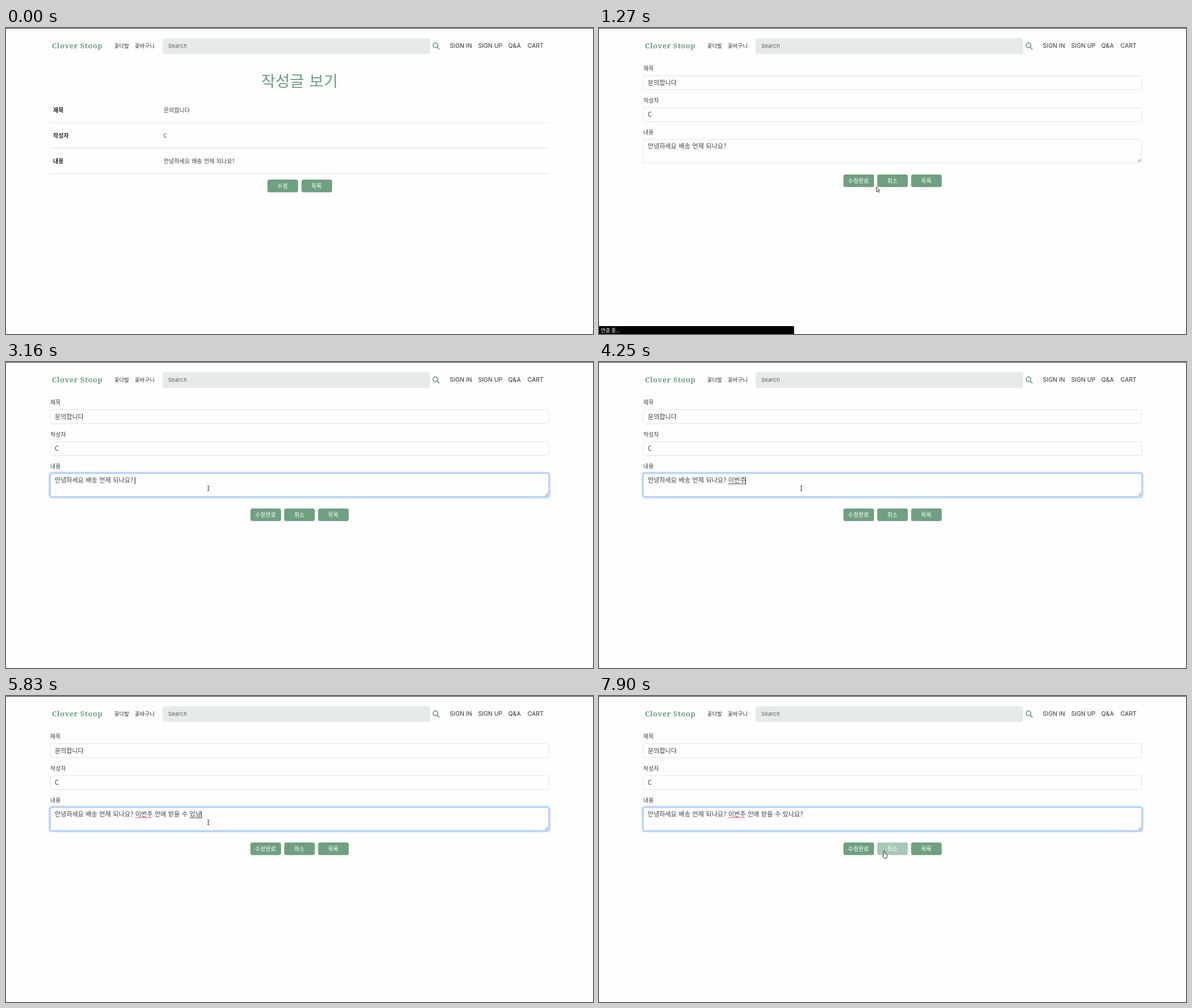
An HTML page that plays this animation: 1035x541 px, repeating every 8000 ms.

```html
<!DOCTYPE html>
<html lang="ko">
<head>
<meta charset="utf-8">
<title>Clover Stoop</title>
<style>
  html, body { margin: 0; width: 100%; height: 100%; overflow: hidden; background: #fefefe; }
  svg { display: block; width: 1035px; height: 541px; }
  text { font: 10px "Noto Sans CJK KR", "Noto Sans CJK JP", "Noto Sans CJK", sans-serif; fill: #3a3f44; white-space: pre; }
  .brand { font: 900 12.8px "Noto Serif", serif; letter-spacing: .55px; fill: #6f9f80; }
  .nav { font: 10.5px Inter, sans-serif; fill: #333; }
  .cat { font-size: 9.5px; font-weight: 500; fill: #333; }
  .hint { font: 9.6px Inter, sans-serif; letter-spacing: .2px; fill: #555c58; }
  .head { font-size: 27.4px; font-weight: 500; fill: #6f9f80; word-spacing: 1.5px; }
  .bold { font-weight: 700; fill: #212529; }
  .field { font-size: 11.1px; word-spacing: .45px; }
  .btn rect { fill: #70a080; }
  .btn text { fill: #fff; text-anchor: middle; }
  .box { fill: #fefefe; stroke: #dee2e6; }
  .rule { stroke: #dee2e6; }
  .cursor { fill: #fff; stroke: #222; stroke-width: .9; stroke-linejoin: round; }
</style>
</head>
<body>
<svg viewBox="0 0 1035 541">
  <rect width="1035" height="541" fill="#fefefe"/>
  <rect width="1035" height="1" fill="#333"/>

  <text class="brand" x="81" y="35.8">Clover Stoop</text>
  <text class="cat" x="190.7" y="34.6">꽃다발</text>
  <text class="cat" x="227" y="34.6">꽃바구니</text>
  <rect x="276" y="18" width="472" height="28" rx="4" fill="#e6ebe7"/>
  <text class="hint" x="286" y="34.6">Search</text>
  <g fill="none" stroke="#6f9f80" stroke-width="1.7" stroke-linecap="round">
    <circle cx="757.3" cy="30.6" r="4.2"/>
    <path d="M760.4 33.8l3.4 3.5"/>
  </g>
  <text class="nav" x="782.6" y="35.2">SIGN IN</text>
  <text class="nav" x="832.4" y="35.2">SIGN UP</text>
  <text class="nav" x="885.6" y="35.2">Q&amp;A</text>
  <text class="nav" x="919.6" y="35.2">CART</text>

  <g id="view">
    <text class="head" x="450" y="104.3">작성글 보기</text>
    <text class="bold" x="83" y="149.3">제목</text>
    <text x="278" y="149.3">문의합니다</text>
    <text class="bold" x="83" y="194.3">작성자</text>
    <text x="277.6" y="194.3">C</text>
    <text class="bold" x="83" y="239.3">내용</text>
    <text x="278" y="239.3" style="word-spacing:.6px">안녕하세요 배송 언제 되나요?</text>
    <path class="rule" d="M78 167.5H957M78 212.5H957M78 257.5H957"/>
    <g class="btn"><rect id="edit" x="461" y="268" width="54" height="22.5" rx="3.5"/><text x="487.5" y="283.2">수정</text></g>
    <g class="btn"><rect x="521" y="268" width="54" height="22.5" rx="3.5"/><text x="547.5" y="283.2">목록</text></g>
  </g>

  <g id="form">
    <text x="78" y="75.4">제목</text>
    <rect class="box" x="78" y="84.5" width="879" height="24.5" rx="3.5"/>
    <text class="field" x="86" y="101">문의합니다</text>
    <text x="78" y="131.8">작성자</text>
    <rect class="box" x="78" y="141" width="879" height="24.5" rx="3.5"/>
    <text class="field" x="86" y="157.2">C</text>
    <text x="78" y="188.2">내용</text>
    <rect id="ring" x="76.3" y="195.3" width="882.4" height="44.4" rx="5" fill="none" stroke="#c6dafc" stroke-width="2.6"/>
    <rect id="area" class="box" x="78" y="197" width="879" height="41" rx="3.5"/>
    <path d="M950.5 236.5l5-5M953.5 236.5l2-2" stroke="#555" stroke-width=".9"/>
    <text id="msg" class="field" x="86" y="213.4"></text>
    <path id="wave" fill="none" stroke="#e0342b" stroke-width=".9"/>
    <path id="under" stroke="#333" stroke-width=".9"/>
    <rect id="caret" y="203" width="1" height="13" fill="#222"/>
    <g class="btn"><rect id="save" x="431" y="259" width="54" height="22.3" rx="3.5"/><text x="457.5" y="274.2">수정완료</text></g>
    <g class="btn"><rect id="cancel" x="490.5" y="259" width="54" height="22.3" rx="3.5"/><text x="517.3" y="274.2">취소</text></g>
    <g class="btn"><rect x="550.3" y="259" width="54" height="22.3" rx="3.5"/><text x="577" y="274.2">목록</text></g>
  </g>

  <g id="status">
    <path d="M0 527H342q2 0 2 2V541H0z"/>
    <text x="3" y="537.6" style="font-size:8.8px;fill:#fff">연결 중...</text>
  </g>

  <g id="pointer">
    <path id="arrow" class="cursor" d="M0 0V8.8L2 7.1 3.4 10.2 4.9 9.5 3.5 6.5H6.1z"/>
    <path id="hand" class="cursor" d="M-1.1 7.4V1a1.1 1.1 0 0 1 2.2 0V4.8l3 .8q1.2.4 1.2 1.8-.1 2.8-1.2 5.2H-.6L-3.3 8.4q.2-1.8 2.2-.2z"/>
    <path id="beam" d="M-1.7 -4.2H-.5L0 -3.7 .5 -4.2H1.7M0 -3.7V3.7M-1.7 4.2H-.5L0 3.7 .5 4.2H1.7" fill="none" stroke="#222" stroke-width="1"/>
  </g>
</svg>
<script>
const LOOP = 8000;
const $ = id => document.getElementById(id);
const show = (id, on) => $(id).style.display = on ? "" : "none";

// time, x, y, pointer shape
const moves = [
  [0, 0, 0, ""],
  [300, 782, 77, "arrow"], [400, 744, 106, "arrow"], [490, 676, 158, "arrow"],
  [590, 606, 212, "arrow"], [690, 548, 254, "arrow"], [780, 511, 277, "hand"],
  [880, 496, 286, "hand"], [980, 490, 283, "hand"], [1070, 489, 281, "hand"],
  [1270, 489, 280.5, "arrow"], [1570, 480, 275, "hand"], [1670, 455, 262, "hand"],
  [1770, 418, 246, "arrow"], [1870, 380, 231, "beam"], [1970, 359, 224, "beam"],
  [2060, 355.5, 223.3, "beam"], [2360, 356.8, 223.3, "beam"],
  [6730, 358, 217, "beam"], [6830, 366, 195, "beam"], [6930, 392, 228, "beam"],
  [7030, 428, 283, "arrow"], [7120, 455, 307, "arrow"], [7200, 475.5, 269, "hand"],
  [7300, 477, 268, "hand"], [7400, 480, 269, "hand"], [7500, 484, 271, "hand"],
  [7600, 493, 273, "hand"], [7700, 499, 274, "hand"], [7800, 502, 274, "hand"],
  [7900, 503, 274, "hand"]
];

// time, finished text, word being composed
const week = "이번주 ";
const typing = [
  [0, "", ""], [3560, "", "ㅇ"], [3750, "", "이"], [3950, "", "이ㅂ"], [4050, "", "이버"],
  [4250, "", "이번주"], [4350, week, ""], [4450, week, "아"], [4550, week, "안"],
  [4650, week, "안에"], [4750, week + "안에 ", ""], [4850, week + "안에 ", "ㅂ"],
  [4950, week + "안에 ", "받"], [5050, week + "안에 ", "받을"],
  [5150, week + "안에 받을 ", ""], [5250, week + "안에 받을 ", "ㅅ"],
  [5350, week + "안에 받을 ", "수"], [5450, week + "안에 받을 수 ", ""],
  [5550, week + "안에 받을 수 ", "이"], [5650, week + "안에 받을 수 ", "있"],
  [5740, week + "안에 받을 수 ", "있ㄴ"], [5830, week + "안에 받을 수 ", "있낭"],
  [5930, week + "안에 받을 수 ", "있나요"], [6130, week + "안에 받을 수 있나요?", ""]
];

const blink = [[0, 0], [2060, 1], [2560, 0], [3160, 1], [6730, 0], [7200, 1], [7700, 0]];

// time, colour
const plain = "#70a080", half = "#7daa8c", light = "#a9c8b4";
const hover = {
  edit: [[0, plain], [780, half], [880, light]],
  save: [[0, plain], [1570, half], [1670, light], [1770, half], [1870, plain],
         [7200, half], [7300, light], [7600, half], [7700, plain]],
  cancel: [[0, plain], [7600, half], [7700, light]]
};

const greeting = "안녕하세요 배송 언제 되나요? ";
const at = (steps, t) => steps.findLast(s => s[0] <= t);
const xAt = n => 86 + (n ? $("msg").getSubStringLength(0, n) : 0);

function zigzag(x, end) {
  let d = `M${x} 215.6`;
  for (let i = 1; x + i * 1.4 <= end; i++) d += `L${x + i * 1.4} ${i % 2 ? 214.4 : 215.6}`;
  return d;
}

function drawText(t) {
  const [, done, word] = at(typing, t);
  const text = greeting + done + word;
  if ($("msg").textContent !== text) $("msg").textContent = text;
  const start = xAt(greeting.length + done.length), end = xAt(text.length);
  $("under").setAttribute("d", word ? `M${start} 215.5H${end}` : "M0 0");
  $("wave").setAttribute("d", done ? zigzag(xAt(greeting.length), xAt(greeting.length + 3)) : "M0 0");
  $("caret").setAttribute("x", Math.round(end - .6));
  show("caret", at(blink, t)[1]);
}

function draw(t) {
  const editing = t >= 1270, focused = t >= 2160;
  show("view", !editing);
  show("form", editing);
  show("status", editing && t < 1570);
  show("ring", focused);
  $("area").style.stroke = focused ? "#86b0f8" : "";
  if (editing) drawText(t);
  for (const id in hover) $(id).style.fill = at(hover[id], t)[1];
  const [, x, y, shape] = at(moves, t);
  $("pointer").setAttribute("transform", `translate(${x} ${y})`);
  for (const id of ["arrow", "hand", "beam"]) show(id, id === shape);
}

const begin = performance.now();
function tick() {
  draw((performance.now() - begin) % LOOP);
  requestAnimationFrame(tick);
}
tick();
</script>
</body>
</html>
```
